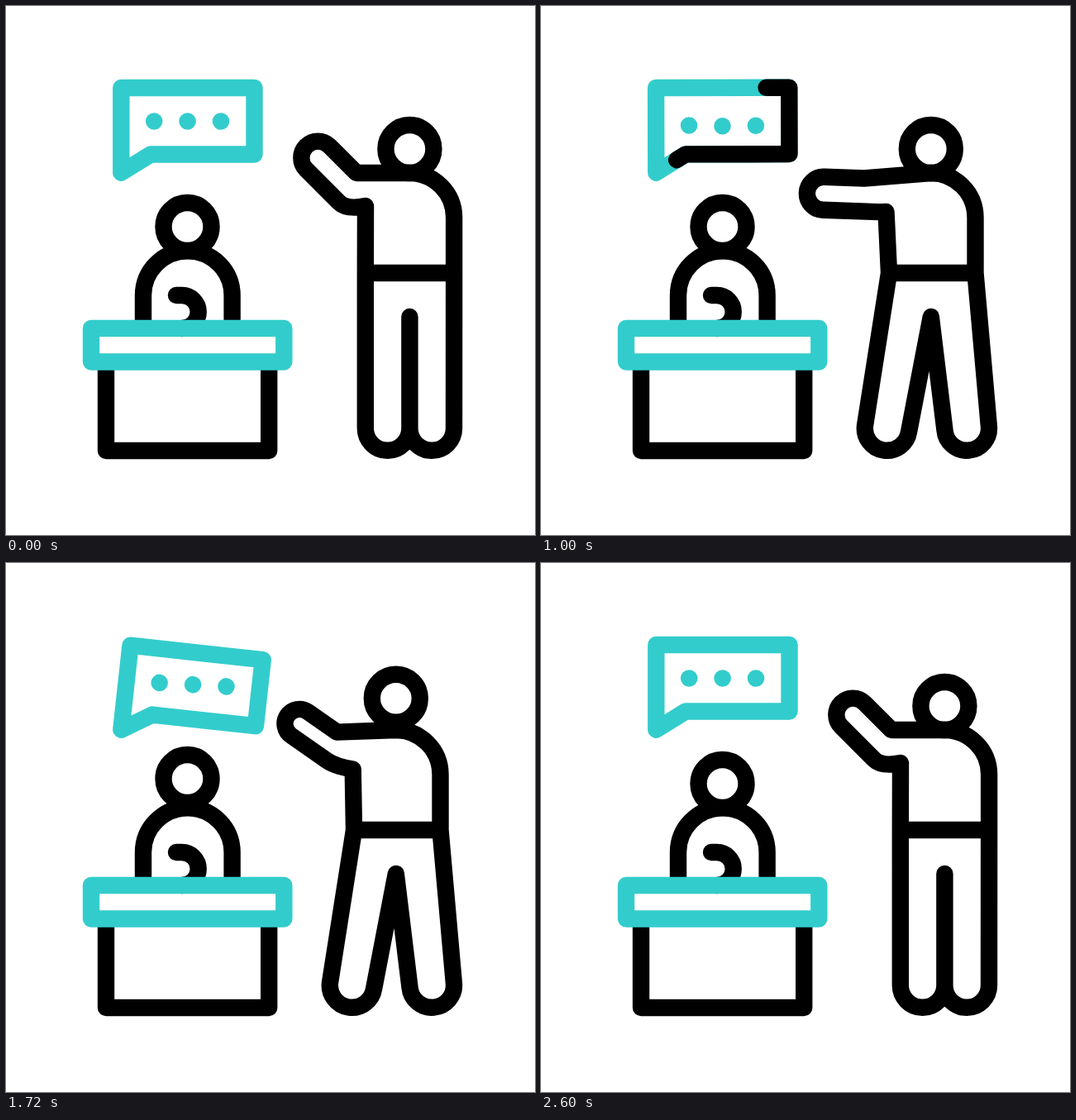
An HTML page for the animation above (3 s loop, 640 px wide and 640 px high).

```html
<!DOCTYPE html>
<html lang="en">
<head>
<meta charset="utf-8">
<title>Speaker and clerk</title>
<style>
  html, body { margin: 0; width: 100%; height: 100%; overflow: hidden; background: #fff; }
  svg { display: block; width: 100%; height: 100%; }
  .line { fill: none; stroke: #000; stroke-width: 20.4; stroke-linecap: round; stroke-linejoin: round; }
  .teal { stroke: #3cc; }
  .butt { stroke-linecap: butt; }
  .dot { fill: #3cc; }
</style>
</head>
<body>
<svg viewBox="0 0 640 640">
  <g class="line">
    <circle id="clerkHead" cx="219.5" r="29"/>
    <path class="butt" d="M166 388V350A53.8 53.8 0 0 1 273.6 350V388"/>
    <path d="M206 350H212.7A20 20 0 0 1 212.7 390"/>
    <path class="butt" d="M121 435V538H318.2V435"/>
    <path class="teal" d="M103 390H336.3V430.5H103Z"/>
    <path id="body"/>
    <circle id="head" r="29"/>
  </g>
  <g id="bubble">
    <path class="line teal" d="M139.3 99H300.5V179.5H175L139.3 201.7Z"/>
    <path class="line" id="trace" pathLength="1" d="M139.3 99H300.5V179.5H175L139.3 201.7V99"/>
    <circle class="dot" cx="179.2" r="10.3"/>
    <circle class="dot" cx="219.6" r="10.3"/>
    <circle class="dot" cx="260" r="10.3"/>
  </g>
</svg>
<script>
const LOOP = 3000;
const $ = id => document.getElementById(id);
const dots = document.querySelectorAll('.dot');

// Eased value at time t through [time, value] keys.
function tween(t, ...keys) {
  let [t0, v0] = keys[0];
  for (const [t1, v1] of keys) {
    if (t < t1) {
      const s = Math.max(0, (t - t0) / (t1 - t0));
      return v0 + (v1 - v0) * s * s * (3 - 2 * s);
    }
    [t0, v0] = [t1, v1];
  }
  return v0;
}

// Point at a distance and angle (degrees) from another.
function polar([x, y], distance, angle) {
  const a = angle * Math.PI / 180;
  return [x + distance * Math.cos(a), y + distance * Math.sin(a)];
}

// Outline of the speaker; lean 0 is upright, 1 is mid-stride.
function pose(lean, armAngle, reach, elbow, armpit) {
  const x = 488.4 - 16.6 * lean;
  const foot = (cx, tilt) => [-26.8, 26.8].map(r => polar([cx, 511], r, tilt * lean));
  const handTop = polar(elbow, -reach, armAngle);
  const handBottom = polar(handTop, 40, armAngle + 90);
  const [footL1, footL2] = foot(461.6 - 43 * lean, 9);
  const [footR1, footR2] = foot(515.2, -5);
  return {
    elbow, handTop, handBottom, armpit,
    fore: polar(handBottom, reach * 1.22, armAngle),
    bend: polar(handBottom, reach * 1.5, armAngle),
    hipL: [434.8 - 13.8 * lean, 323], footL1, footL2,
    crotch: [x, 376], footR1, footR2,
    hipR: [x + 53.7, 323], side: [x + 53.7, 256], neck: [x, 202]
  };
}

const rest = pose(0, 45, 46, [424, 202], [435, 242]);
const poses = [
  rest,
  pose(1, 2, 48.5, [391, 208.5], [417.5, 249]),
  pose(1, 60, 50, [408, 201.5], [421.5, 250]),
  rest
];

function drawSpeaker(t) {
  const phase = tween(t, [200, 0], [700, 1], [1400, 1], [2000, 2], [2500, 3]);
  const i = Math.min(2, Math.floor(phase)), k = phase - i;
  const p = {};
  for (const name in rest) {
    p[name] = poses[i][name].map((v, axis) => v + (poses[i + 1][name][axis] - v) * k);
  }
  const cap = 'A1 1 0 0 0 '; // radius grows to half the chord
  $('body').setAttribute('d',
    `M${p.armpit}L${p.hipL}L${p.footL1}${cap}${p.footL2}L${p.crotch}` +
    `L${p.footR1}${cap}${p.footR2}L${p.hipR}L${p.side}A53.8 53.8 0 0 0 ${p.neck}` +
    `L${p.elbow}L${p.handTop}${cap}${p.handBottom}L${p.fore}Q${p.bend} ${p.armpit}Z` +
    `M${p.hipL}L${p.hipR}`);
  $('head').setAttribute('cx', p.neck[0]);
  $('head').setAttribute('cy', 173 + tween(t, [1400, 0], [2000, -16.7], [2500, 0]));
}

function drawBubble(t) {
  const angle = tween(t, [400, 0], [840, 14], [1160, -14], [1600, 8], [2150, -6], [2600, 0]);
  $('bubble').setAttribute('transform', `rotate(${angle} 139.3 201.7)`);

  const start = tween(t, [700, 0], [1600, 1]), end = tween(t, [400, 0], [1300, 1]);
  const trace = $('trace').style;
  trace.display = end > start ? '' : 'none';
  trace.strokeDasharray = `${end - start} 2`;
  trace.strokeDashoffset = -start;

  const bounce = [0, 6, -6, 3, 0].map((y, i) => [440 + 480 * i, 139.5 + y]);
  dots.forEach((dot, n) => dot.setAttribute('cy', tween(t - 80 * n, ...bounce)));
}

function drawClerk(t) {
  const beat = 595, u = t > 400 && t < 400 + 3 * beat ? (t - 400) % beat : 0;
  $('clerkHead').setAttribute('cy', 267 + tween(u, [0, 0], [beat / 2, -14.5], [beat, 0]));
}

function frame() {
  const t = performance.now() % LOOP;
  drawSpeaker(t);
  drawBubble(t);
  drawClerk(t);
  requestAnimationFrame(frame);
}
frame();
</script>
</body>
</html>
```
